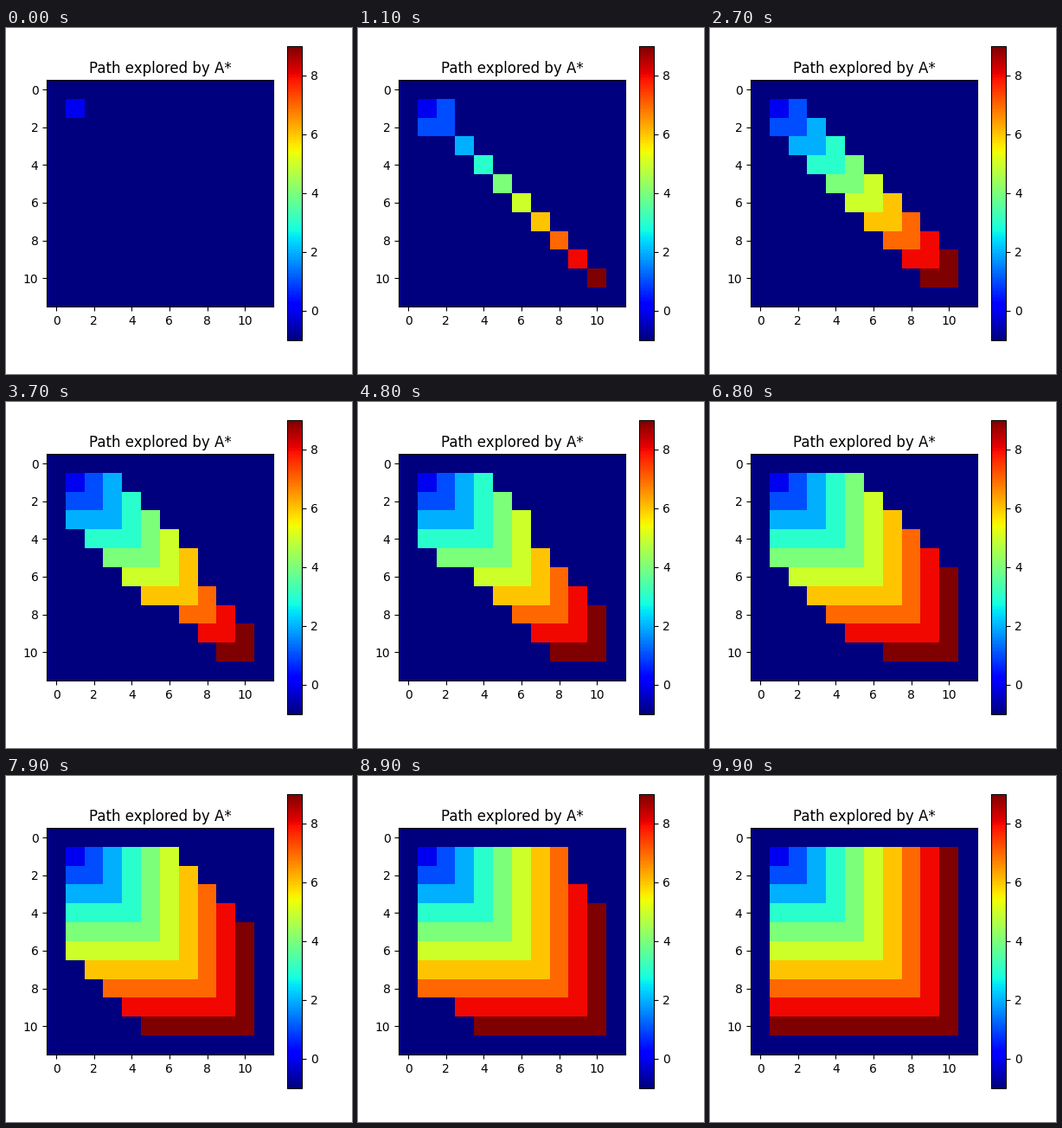
A matplotlib script that plays this animation: 400x400 px, repeating every 10000 ms.

```python
import numpy as np
import matplotlib.pyplot as plt
from matplotlib.animation import FuncAnimation

STAGE = 400
SIZE = 12       # grid side, including a one-cell border
LAST = SIZE - 2

plt.rcParams["font.family"] = "DejaVu Sans"


def visit_order():
    """Cells sorted by f = g + h (Chebyshev), then by g, then by position."""
    cells = [(r, c) for r in range(1, LAST + 1) for c in range(1, LAST + 1)]

    def key(cell):
        g = max(cell) - 1
        h = LAST - min(cell)
        return g + h, g, cell

    return sorted(cells, key=key)


def pixel_axes(fig, left, bottom, width, height):
    return fig.add_axes([v / STAGE for v in (left, bottom, width, height)])


order = visit_order()


def grid_at(step):
    grid = np.full((SIZE, SIZE), -1.0)
    for r, c in order[:step + 1]:
        grid[r, c] = max(r, c) - 1
    return grid


fig = plt.figure(figsize=(4, 4), dpi=100, facecolor="white")
ax = pixel_axes(fig, 47.1, 78.1, 261.8, 261.8)
image = ax.imshow(grid_at(0), cmap="jet", vmin=-1, vmax=LAST - 1,
                  interpolation="nearest")
ax.set_xticks(range(0, SIZE, 2))
ax.set_yticks(range(0, SIZE, 2))
ax.set_title("Path explored by A*", fontsize=12)

cax = pixel_axes(fig, 325.3, 39, 17, 340)
fig.colorbar(image, cax=cax, ticks=range(0, LAST, 2))


def update(step):
    image.set_data(grid_at(step))
    return [image]


anim = FuncAnimation(fig, update, frames=len(order), interval=100,
                     repeat=True, repeat_delay=0, blit=False)
plt.show()
```
